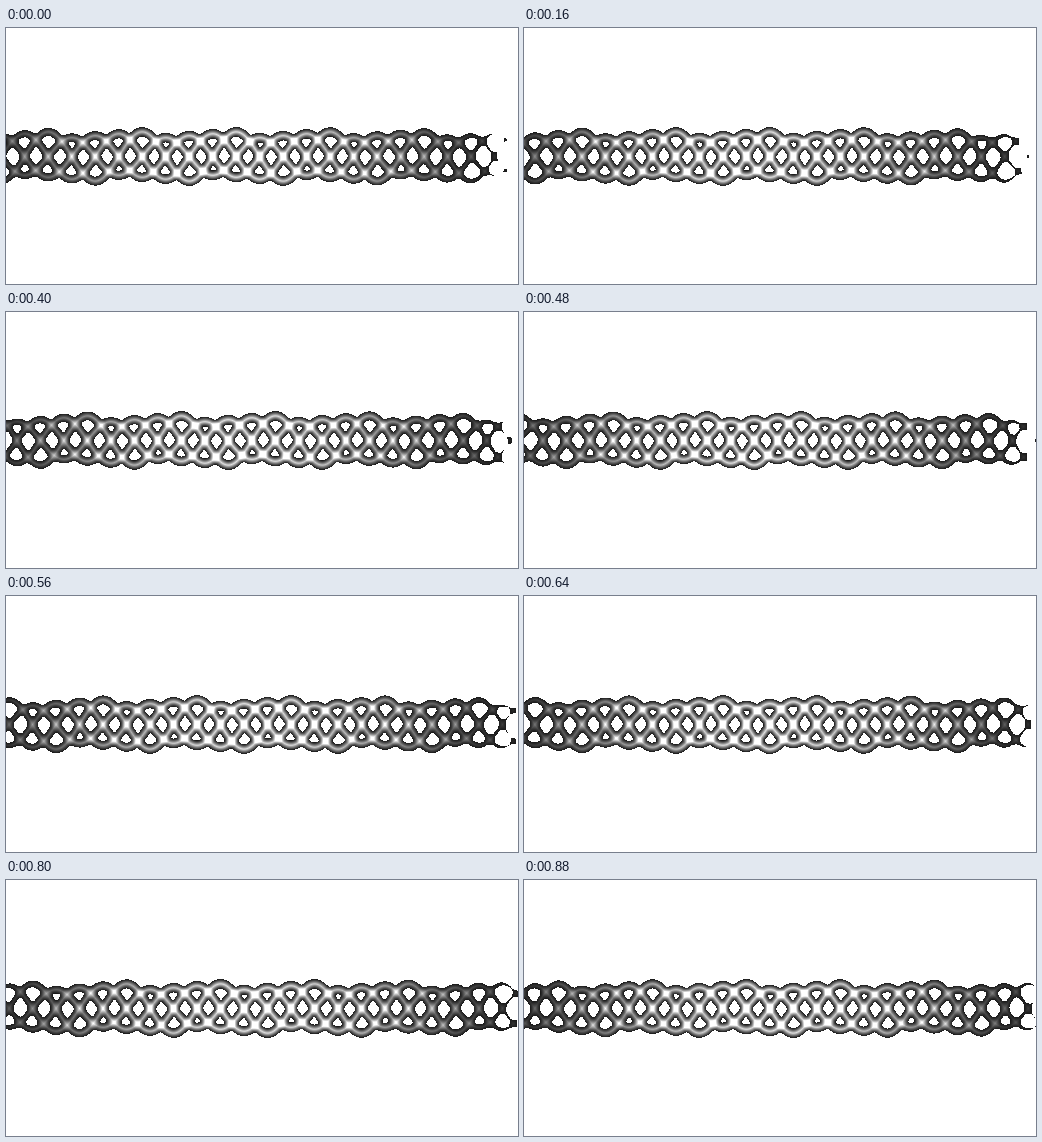
Write an HTML page with a canvas that moves like this. It is 512x256 px and loops after 0.96 s.

```html
<!DOCTYPE html>
<html>
<head>
<meta charset="utf-8">
<title>Braid</title>
<style>
html, body { margin: 0; width: 100%; height: 100%; overflow: hidden; background: #fff; }
canvas { display: block; }
</style>
</head>
<body>
<canvas id="stage" width="512" height="256"></canvas>
<script>
const ctx = document.getElementById('stage').getContext('2d');
const W = 512, TOP = 96, ROWS = 66, MID = 128;
const STEPS = 12, STEP_MS = 80;
const WAVE = 94, FIRST_PEAK = 41.7, AMPS = [24.6, 18.8, 20.8, 22.7];
const FADE_LENGTH = 600, DRIFT = WAVE / 4, THRESHOLD = 0.11;
const RADIUS = 5.9, REACH = 6;

// Glow of one strand, by distance from its centre line
const glow = d => Math.pow(1 - d / RADIUS, 1.3);

function addStrand(field, amp, peak) {
  const curve = x => MID - amp * Math.cos(2 * Math.PI * (x - peak) / WAVE);
  const ys = Array.from({ length: 4 * (W + 2 * REACH) + 1 }, (_, i) => curve(i / 4 - REACH));
  for (let x = 0; x < W; x++) {
    const centre = 4 * (x + REACH);
    for (let row = 0; row < ROWS; row++) {
      const y = row + TOP;
      if (Math.abs(ys[centre] - y) > 2.2 * RADIUS) continue;
      let nearest = Infinity;
      for (let k = -4 * REACH; k <= 4 * REACH; k++) {
        const dy = ys[centre + k] - y;
        nearest = Math.min(nearest, k * k / 16 + dy * dy);
      }
      if (nearest < RADIUS * RADIUS) field[row * W + x] += glow(Math.sqrt(nearest));
    }
  }
}

function draw(step) {
  const progress = step / STEPS;
  const field = new Float32Array(W * ROWS);
  AMPS.forEach((amp, i) => addStrand(field, amp, FIRST_PEAK + WAVE * (progress + i / 4)));

  const image = ctx.createImageData(W, ROWS);
  const fadeEnd = 524 + DRIFT * progress;
  field.forEach((value, i) => {
    const fade = Math.sin(Math.PI * Math.max(0, fadeEnd - i % W) / FADE_LENGTH);
    const light = value * Math.pow(fade, 1.3);
    if (light < THRESHOLD) return;
    const gray = 225 * light;
    image.data.set([gray, gray, gray, 255], i * 4);
  });
  ctx.putImageData(image, 0, TOP);
}

let shown = -1;
function tick() {
  const step = Math.floor(performance.now() / STEP_MS) % STEPS;
  if (step !== shown) draw(shown = step);
  requestAnimationFrame(tick);
}
tick();
</script>
</body>
</html>
```
